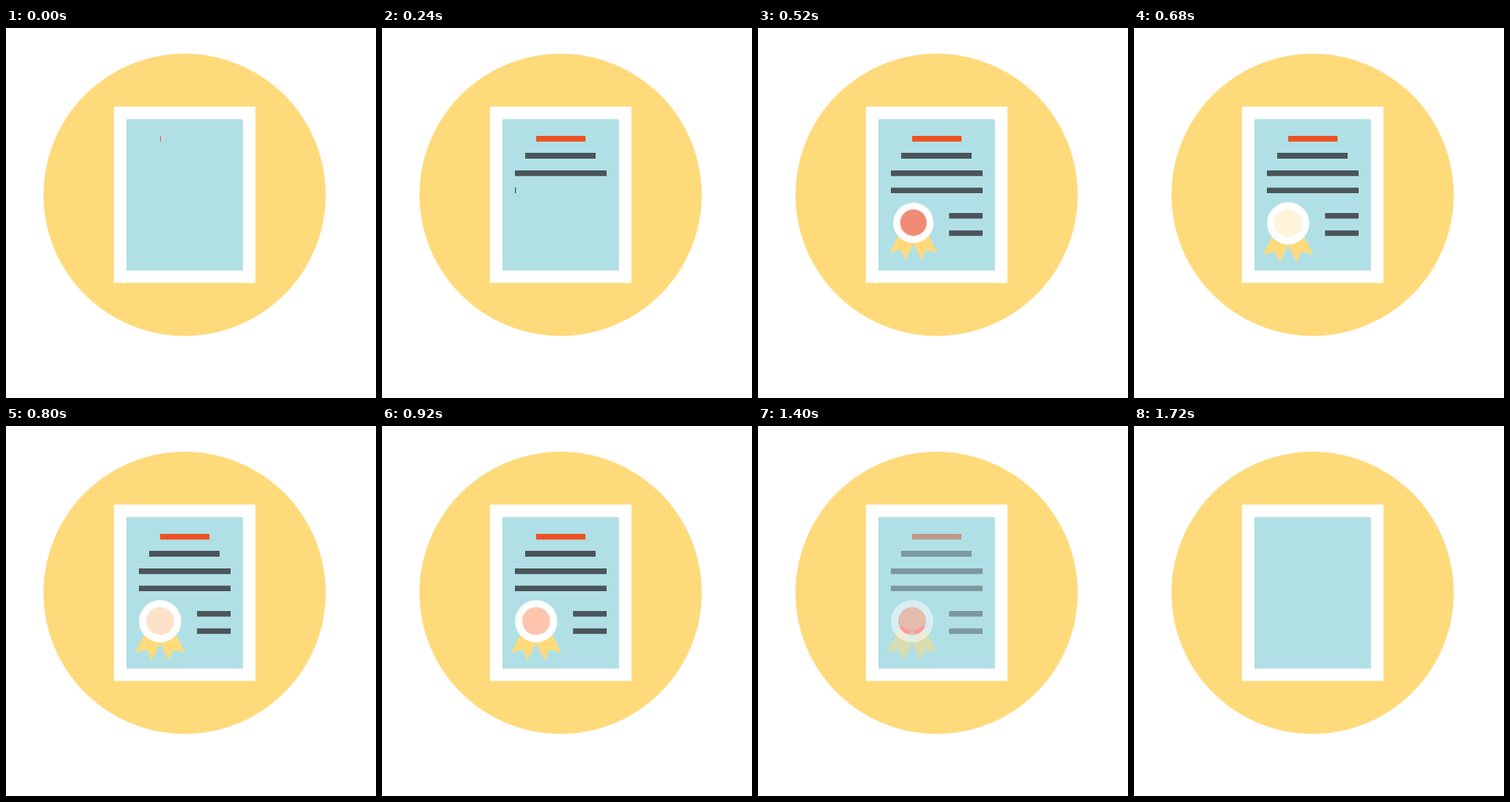
An HTML page for the animation above (1760 ms loop, 504x504 px).

```html
<!DOCTYPE html>
<html lang="en">
<head>
<meta charset="utf-8">
<title>Certificate</title>
<style>
  html, body { margin: 0; width: 100%; height: 100%; overflow: hidden; background: #fff; }
  svg { display: block; width: 504px; height: 504px; }

  .bar, .medal, .fade, .seal, .title, .tint { animation: 1760ms linear infinite; }

  /* Bars are written one after another, left to right. */
  .bar { transform-box: fill-box; transform-origin: left; fill: #4b545b; }
  .b1 { animation-name: write1; }
  .b2 { animation-name: write2; }
  .b3 { animation-name: write3; }
  .b4 { animation-name: write4; }
  .b5 { animation-name: write5; }
  .b6 { animation-name: write6; }
  @keyframes write1 { 0% { transform: scaleX(0); } 4.545%, 100% { transform: none; } }
  @keyframes write2 { 0%, 4.545% { transform: scaleX(0); } 9.09%, 100% { transform: none; } }
  @keyframes write3 { 0%, 9.09% { transform: scaleX(0); } 13.636%, 100% { transform: none; } }
  @keyframes write4 { 0%, 13.636% { transform: scaleX(0); } 18.18%, 100% { transform: none; } }
  @keyframes write5 { 0%, 18.18% { transform: scaleX(0); } 22.6%, 100% { transform: none; } }
  @keyframes write6 { 0%, 22.9% { transform: scaleX(0); } 27.27%, 100% { transform: none; } }

  .title { animation-name: title; }
  @keyframes title { 0%, 70.3% { fill: #ee5122; } 70.4%, 100% { fill: #cb5033; } }

  .medal { transform-origin: 247px 253px; animation-name: grow; }
  @keyframes grow {
    0%, 13.636% { transform: scale(0); }
    22.727% { transform: scale(.81); }
    31.818%, 100% { transform: none; }
  }

  .seal { animation-name: pulse; }
  @keyframes pulse {
    0%, 22.8% { fill: #f49090; }
    31.818%, 33% { fill: #ef8b6c; }
    38.636%, 40.909% { fill: #fef4dc; }
    52.273% { fill: #ffc4ad; }
    61.364%, 100% { fill: #ef8b6c; }
  }

  .fade { animation-name: fade; }
  @keyframes fade {
    0%, 70.455% { opacity: 1; }
    79.545% { opacity: .51; }
    88.636% { opacity: .16; }
    97.727%, 100% { opacity: 0; }
  }

  .tint { animation-name: tint; }
  @keyframes tint {
    0%, 70.455% { opacity: 0; }
    79.545% { opacity: 1; }
    90%, 100% { opacity: 0; }
  }
</style>
</head>
<body>
<svg viewBox="0 0 504 504">
  <defs>
    <path id="ribbon" clip-rule="evenodd" fill-rule="evenodd"
      d="M194.5 272L176 308.500L192 304.500L198.500 319.500L216 283Z
         M225.500 272L244 308.500L228 304.500L221.500 319.500L204 283Z"/>
    <clipPath id="tails"><use href="#ribbon" clip-rule="evenodd"/></clipPath>
  </defs>

  <circle cx="243.300" cy="227.200" r="192.200" fill="#ffda7b"/>
  <path d="M147 107H339.700V347.300H147Z" fill="#fff"/>
  <path d="M164 124.300H322.800V330.600H164Z" fill="#b0e0e5"/>

  <g class="fade">
    <g class="title"><rect class="bar b1" x="210" y="147" width="67.200" height="7.700" style="fill:inherit"/></g>
    <rect class="bar b2" x="195" y="170" width="96" height="8"/>
    <rect class="bar b3" x="181" y="194" width="125" height="7.700"/>
    <rect class="bar b4" x="181" y="217.500" width="125" height="7.500"/>
    <rect class="bar b5" x="260.200" y="252" width="45.800" height="7.600"/>
    <rect class="bar b6" x="260.200" y="275.700" width="45.800" height="7.500"/>
  </g>

  <g class="medal">
    <use class="fade" href="#ribbon" fill="#ffda7b"/>
    <circle class="fade" cx="210" cy="266" r="28.800" fill="#fff"/>
    <g class="fade"><circle class="seal" cx="210" cy="265.700" r="19"/></g>
    <g class="tint" clip-path="url(#tails)"><circle cx="210" cy="265.700" r="19" fill="#fd9aa0"/></g>
  </g>
</svg>
</body>
</html>
```
